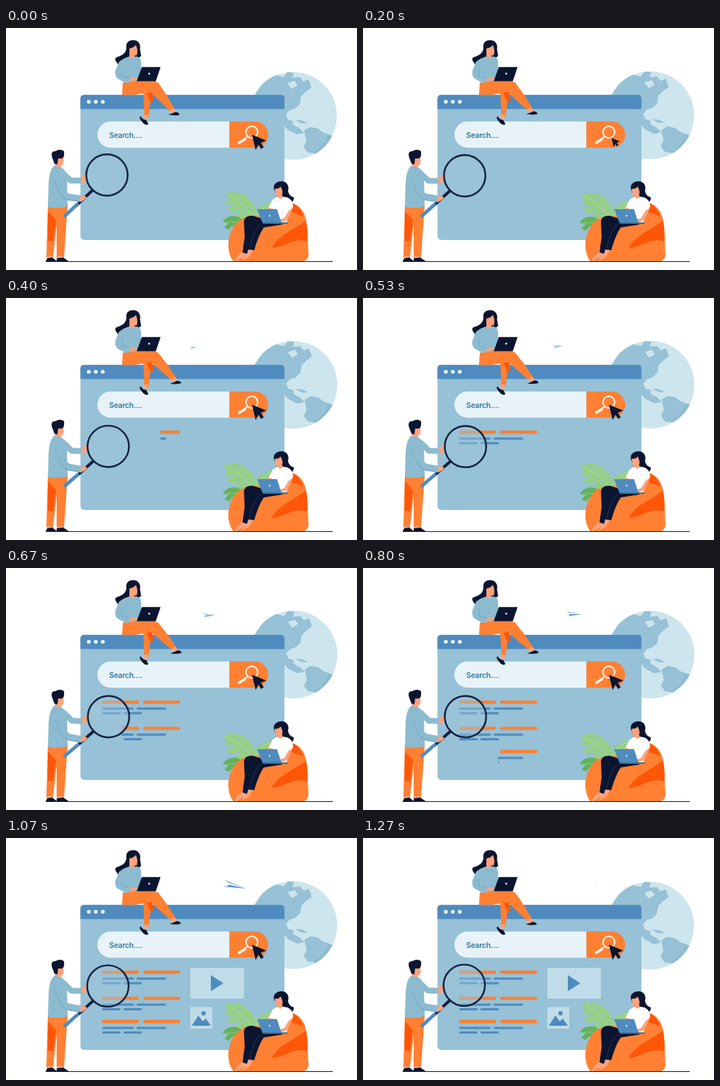
Write an HTML page that moves like this. It is 478 px wide and 330 px high and loops after 1340 ms.

```html
<!DOCTYPE html>
<html lang="en">
<head>
<meta charset="utf-8">
<title>Search illustration</title>
<style>
  html, body { margin: 0; width: 100%; height: 100%; overflow: hidden; background: #fff; }
  svg { display: block; width: 478px; height: 330px; }
  .navy { fill: #0b1530; }
  .blue { fill: #4f8bbf; }
  .panel { fill: #96c1d6; }
  .shirt { fill: #8cbbd0; }
  .orange { fill: #ff8033; }
  .deep { fill: #ff5608; }
  .skin { fill: #ffa27c; }
  .pale { fill: #e8f3f9; }
  .line { fill: none; stroke-linecap: round; stroke-linejoin: round; }
</style>
</head>
<body>
<svg viewBox="0 0 478 330">
  <defs>
    <clipPath id="disc"><circle cx="390.8" cy="119.7" r="60"/></clipPath>
    <clipPath id="pill"><rect x="124.5" y="127.5" width="232.5" height="35.7" rx="17.8"/></clipPath>
  </defs>

  <g id="globe"><g clip-path="url(#disc)">
    <circle cx="390.8" cy="119.7" r="60" fill="#cde5ed"/>
    <path class="panel" d="M336 96 350 74 366 64 378 67 383 60 392 61 390 68 400 67 405 73 412 70 416 81 408 87 402 93 400 104 393 110 386 112 381 118 384 125 391 127 391 132 400 137 406 143 396 145 384 139 374 128 366 118 340 112Z"/>
    <path d="M383 75 393 72 397 78 389 83Z" fill="#cde5ed"/>
    <path class="panel" d="M393 125 403 126 411 130 402 130ZM406 140 414 135 425 137 431 142 445 147 441 155 432 164 424 171 411 170 405 162 409 154Z"/>
    <path d="M418 170Q435 160 438 146L446 148 437 167 424 176Z" fill="#85b6ce" opacity=".6"/>
  </g></g>

  <rect class="panel" x="101.4" y="91.3" width="277.8" height="197.6" rx="5"/>
  <path class="blue" d="M101.4 110.5V96.3Q101.4 91.3 106.4 91.3H374.2Q379.2 91.3 379.2 96.3V110.5Z"/>
  <g class="pale"><circle cx="112.8" cy="100.6" r="2.7"/><circle cx="122.3" cy="100.6" r="2.7"/><circle cx="131.8" cy="100.6" r="2.7"/></g>
  <g clip-path="url(#pill)">
    <path class="pale" d="M124 127H304.3V164H124Z"/>
    <path class="orange" d="M304.3 127H358V164H304.3Z"/>
  </g>
  <text x="140.5" y="150.4" font-family="Inter, sans-serif" font-size="10.2" font-weight="600" letter-spacing="-.22" fill="#34779c">Search....</text>
  <g class="line" stroke="#fff3e8"><circle cx="334.8" cy="142" r="8" stroke-width="2"/><path d="M329 148 325 151" stroke-width="2"/><path d="M325.5 151.5 317.5 156.5" stroke-width="3.4"/></g>
  <path id="cursor" class="navy" d="M335 145.5 354.5 153.5 347 156.5 351 162.5 347.5 165 343.8 159 340 166.5Z"/>

  <g id="results"></g>
  <g id="video"><path d="M251 177H324V219H251Z" fill="#bfdce8"/><path class="blue" d="M279 187 296 198 279 209Z"/></g>
  <g id="photo"><path d="M251 230.5H281V260H251Z" fill="#bfdce8"/><path class="blue" d="M253 256 262 242 268 250 272 246 279 256Z"/><circle class="blue" cx="269" cy="239" r="3"/></g>

  <g id="plane">
    <path class="panel" d="M-13-7 16 5-9-3Z"/>
    <path class="blue" d="M-16 2 16 5-9-.5-8 1.5Z"/>
  </g>

  <!-- woman on the window -->
  <path class="navy" d="M164 27C163 20 167 16.5 173 16.5C180 16.5 184 22 182.5 29L184 38 178 43 166 45C164 54 157 55 153 52C154 48 148 47 149 41C153 38 163 38 164 27Z"/>
  <path class="orange" d="M172 76 190 73 199 84 194 121H188.5L187 90Z"/>
  <path class="deep" d="M191 87 199 84 201 101 195 98Z"/>
  <path class="skin" d="M189 118H194L191 125 186 122Z"/>
  <path class="navy" d="M183 120Q186 125 191 125.5L194 131Q189 135 182 123Z"/>
  <g id="leg">
    <path class="orange" d="M190 80 207 74Q219 91 229 109L223 113Q211 102 198 88Z"/>
    <path class="skin" d="M223 112 228 109 232 115 226 117Z"/>
    <path class="navy" d="M221 118Q225 117 231 114.5Q237 116 236 118.5 230 120 221 118Z"/>
  </g>
  <path class="orange" d="M159 75C168 69 194 69 203 72C210 76 208 85 200 87L176 91H158Z"/>
  <path class="shirt" d="M154 46Q160 41 167 39L179 39Q184 41 184 47L184 71 163 75 152 69Q148 66 149 58Z"/>
  <path class="line" d="M158 56 158 66 171 69" stroke="#6fa5c1" stroke-width=".8"/>
  <path class="skin" d="M168 28Q174 27 177 23Q181 34 177 38L175 37 175 40Q171 42 168 39ZM169 67 179 68 180 71 168 72Z"/>
  <path class="navy" d="M178 72.5 185 53.3H210.5L204 72.5Z"/>
  <circle class="pale" cx="195" cy="62.3" r="1.3"/>

  <!-- man with the magnifier -->
  <path class="orange" d="M57 242H84L79 313H69L69 268 64 313H55Z"/>
  <path class="deep" d="M57 250 68 262 64 291 57 290Z"/>
  <path class="skin" d="M56 311H63V315H56ZM70 311H78V315H70Z"/>
  <path class="navy" d="M54 318.5 56 314 63 313 70 318.5ZM69 318.5V314L78 313 86 318.5Z"/>
  <path class="skin" d="M67 176H78Q80 186 75 188V193L66 191Z"/>
  <path class="navy" d="M63 177Q60 168 67 168Q74 164 79 168Q80 177 76 178L71 178 70 186 66 185Z"/>
  <path class="shirt" d="M66 188 75 190Q82 193 83 204L84 243Q70 247 57 244L58 212Q59 192 66 188Z"/>
  <g id="lens">
    <path class="line" d="M77 198 88 208 102 208" stroke="#8cbbd0" stroke-width="8"/>
    <path class="skin" d="M102 204 107 199 109 203 107 211 102 212Z"/>
    <circle cx="137.5" cy="200.5" r="28.2" fill="#9dc5da" fill-opacity=".45" stroke="#14213f" stroke-width="2.4"/>
    <path class="line" d="M117.5 221.5 96 242" stroke="#14213f" stroke-width="4"/>
    <path class="line" d="M97 240.5 80.5 256" stroke="#4f8bbf" stroke-width="4.6"/>
    <path class="line" d="M69 206 76 222Q80 230 86 231L101 233" stroke="#6fa5c1" stroke-width="8.6"/>
    <path class="line" d="M69 205 76 221Q80 229 86 230L101 232.2" stroke="#8cbbd0" stroke-width="8.2"/>
    <path class="skin" d="M101 230 106 228 110 231 106 235 101 236Z"/>
  </g>

  <!-- plant, bean bag and reader -->
  <g id="plant">
    <path fill="#95ce89" d="M298 226Q320 219 333 235Q345 247 338 261Q324 263 313 256L320 249 307 252 301 245 313 241 299 239 303 232ZM340 258Q339 240 363 236Q367 251 351 258Z"/>
    <path class="line" d="M303 228Q326 239 337 261M338 260Q347 246 361 239" stroke="#b5dda6" stroke-width=".8"/>
    <path class="panel" d="M316 231 320 230 321 234ZM323 246 328 246 325 250ZM350 237 353 244 355 236Z"/>
    <path fill="#65b25c" d="M295 264Q302 254 316 257Q326 263 320 273L310 275 309 269 303 275 297 272 303 266Z"/>
    <path class="line" d="M300 265Q313 262 327 270" stroke="#95ce89" stroke-width=".8"/>
  </g>
  <path class="orange" d="M310 318.5C300 306 301 284 310 271C318 257 335 254 352 258L391 239C403 243 409 256 410 270L412 310Q411 317 404 318.5Z"/>
  <path class="deep" d="M362 300C370 283 391 276 408 263Q412 277 410 291C391 285 382 298 362 300ZM391 239Q402 246 405 257L389 251Z"/>
  <path class="skin" d="M322 300 329 303 325 311 314 318H311Q314 311 320 307ZM332 299 337 302 331 312 320 318Q326 309 332 299Z"/>
  <path class="navy" d="M378 264 376 268 351 272Q344 282 338 303L330 302 328 308 322 306 325 285 324 263Q326 255 336 256L352 261Z"/>
  <path class="line" d="M348 267Q338 272 332 300" stroke="#39456a" stroke-width=".6"/>
  <path class="navy" d="M365 220C363 213 369 209 375 209C383 209 386 216 384 222Q385 229 392 231Q392 237 387 239L370 233Z"/>
  <path fill="#fff" d="M363 234 371 229 383 231Q391 234 391 244L386 251 382 266 361 262 364 247 357 246Z"/>
  <path class="skin" d="M366 219Q371 220 374 216Q378 224 376 227L377 231Q373 235 370 230Q366 229 366 219ZM385 249 391 245 383 262 371 266 371 262 379 259ZM358 245 364 247 361 251 355 249Z"/>
  <path class="blue" d="M342 247H369L375 265H349Z"/><path d="M349 265H383L384 267H350Z" fill="#34779c"/>
  <circle class="pale" cx="359" cy="256" r="1.2"/>
  <path d="M54 318.5H445" stroke="#14213f"/>
</svg>
<script>
const PERIOD = 1340, STEPS = 20;
const el = id => document.getElementById(id);
const move = (id, transform) => el(id).setAttribute('transform', transform);
const clamp = v => Math.max(0, Math.min(1, v));

// Bars of one result: class, left, right, vertical offset, thickness
const BARS = [
  ['orange', 131, 181, 0, 4.4], ['orange', 187, 237, 0, 4.4],
  ['blue', 131, 174, 8.7, 3], ['blue', 178, 218, 8.7, 3],
  ['blue', 131, 156, 15, 3], ['blue', 160, 185, 15, 3]
];
const ROWS = [183, 218.6, 250.3];

// Flight path: step, x, y, size, angle
const FLIGHT = [[2, 236, 77, 0, -30], [3, 240, 75, .1, -28], [6, 255, 67, .32, -25],
  [8, 265, 65, .45, -21], [12, 287, 62, .7, -12], [16, 311, 64, 1, 0], [19, 317, 64, .1, 0], [20, 318, 64, 0, 0]];

function flightAt(k) {
  const i = Math.max(1, FLIGHT.findIndex(p => p[0] >= k));
  const a = FLIGHT[i - 1], b = FLIGHT[i], f = clamp((k - a[0]) / (b[0] - a[0]));
  return a.map((v, j) => v + (b[j] - v) * f);
}

function zoom(id, x, y, s) {
  move(id, `translate(${x} ${y}) scale(${s}) translate(${-x} ${-y})`);
}

// Each row is wiped in from right to left
function results(k) {
  return ROWS.map((y, row) => {
    const edge = 237 - 40 * (k - 5.33 - 2.67 * row);
    return BARS.map(([cls, left, right, dy, h]) => {
      const x = Math.max(left, edge);
      return x < right - .1
        ? `<rect class="${cls}" x="${x}" y="${y + dy - h / 2}" width="${right - x}" height="${h}" rx="1.3"/>` : '';
    }).join('');
  }).join('');
}

function draw(ms) {
  const k = Math.floor((ms % PERIOD + 6.7) * STEPS / PERIOD) % STEPS;
  const sway = Math.sin(Math.PI * k / STEPS);
  move('globe', `translate(${.7 * sway} ${-1.6 * sway})`);
  move('lens', `rotate(${2.2 * sway} 80 257)`);
  move('plant', `rotate(${-4.5 * sway} 338 265)`);
  move('leg', `rotate(${-4.5 * sway} 203 78)`);
  zoom('cursor', 343.5, 156.5, 1 - .42 * clamp(1 - Math.abs(k - 3) / 3));
  zoom('video', 287.5, 198, clamp((k - 12) / 3));
  zoom('photo', 266, 245, clamp((k - 13) / 3));
  const [, x, y, size, angle] = flightAt(k);
  move('plane', `translate(${x} ${y}) rotate(${angle}) scale(${size})`);
  el('results').innerHTML = results(k);
}

const start = performance.now();
function tick() {
  draw(performance.now() - start);
  requestAnimationFrame(tick);
}
tick();
</script>
</body>
</html>
```
